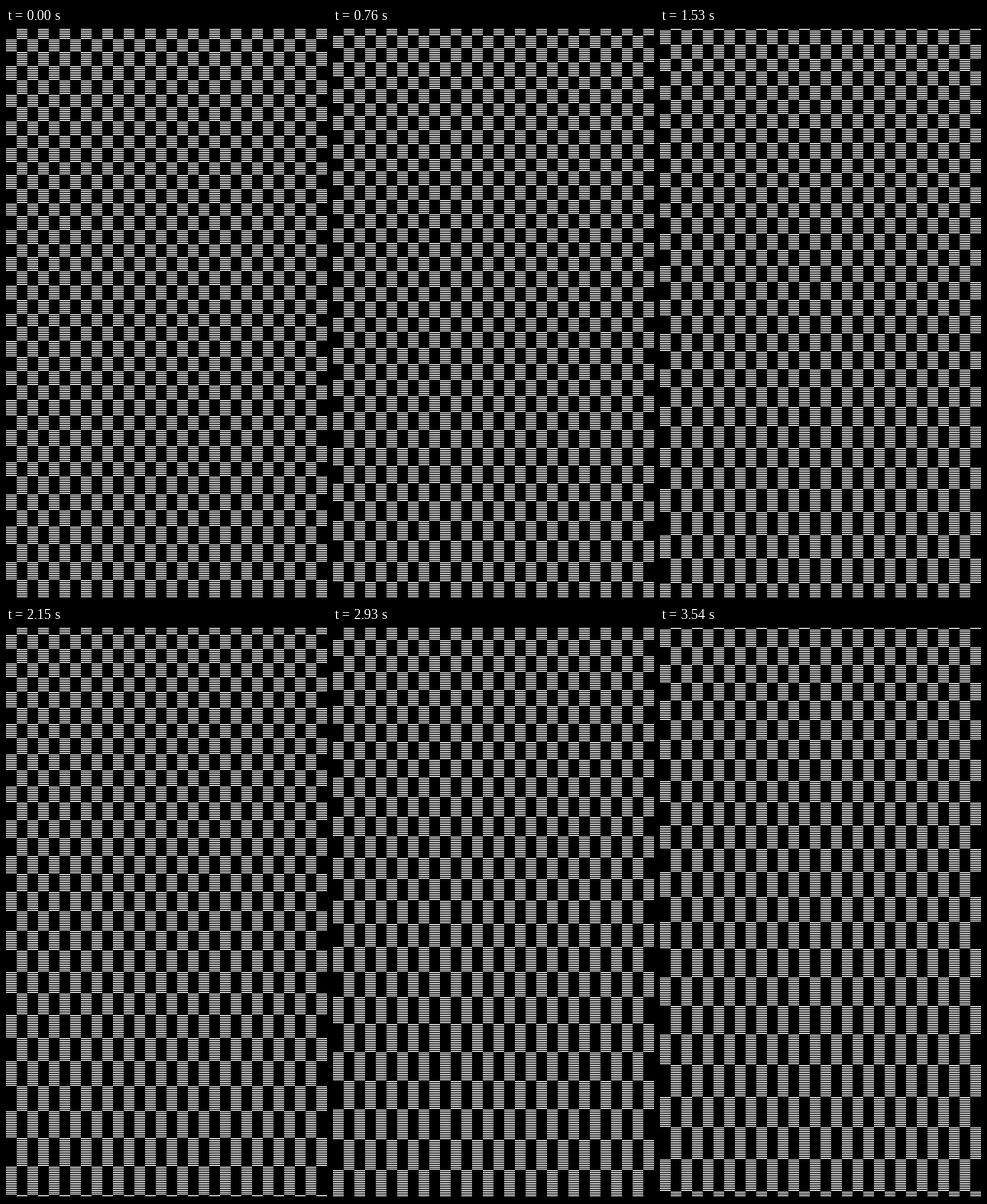
Animation, 360 px wide and 640 px high, one loop 3620 ms. Source, as an HTML page with a canvas:

```html
<!DOCTYPE html>
<html lang="en">
<head>
<meta charset="utf-8">
<title>Checker wave</title>
<style>
  html, body { margin: 0; width: 100%; height: 100%; overflow: hidden; background: #000; }
  canvas { display: block; width: 360px; height: 640px; }
</style>
</head>
<body>
<canvas id="stage" width="360" height="640"></canvas>
<script>
const W = 360, H = 640, COL = 12, LOOP = 3620;
const ctx = document.getElementById('stage').getContext('2d');

// Step lengths in units of 10 ms
const steps = [...'78788788787888788788878878888788888788887887887' + ''].map(Number);
const starts = [];
steps.reduce((sum, s) => (starts.push(sum * 10), sum + s), 0);

// Checker row at height y: an even grid bent by one slow sine
function rowAt(y, ms) {
  const v = y / H;
  const phase = -0.486 + 0.511 * ms / 1000;
  return Math.floor(30 * v + 6.01 * Math.sin(2 * v + phase) + 0.105);
}

function draw(ms) {
  ctx.fillStyle = '#000';
  ctx.fillRect(0, 0, W, H);
  ctx.fillStyle = '#fff';
  for (let y = 1; y < H - 2; y += 2) {
    const odd = Math.abs(rowAt(y, ms)) % 2;
    for (let x = odd * COL; x < W; x += 2 * COL) ctx.fillRect(x, y, COL, 1);
  }
}

let shown = -1;
function tick(now) {
  const t = now % LOOP;
  let i = starts.length - 1;
  while (starts[i] > t) i--;
  if (i !== shown) draw(starts[shown = i]);
  requestAnimationFrame(tick);
}
draw(0);
requestAnimationFrame(tick);
</script>
</body>
</html>
```
